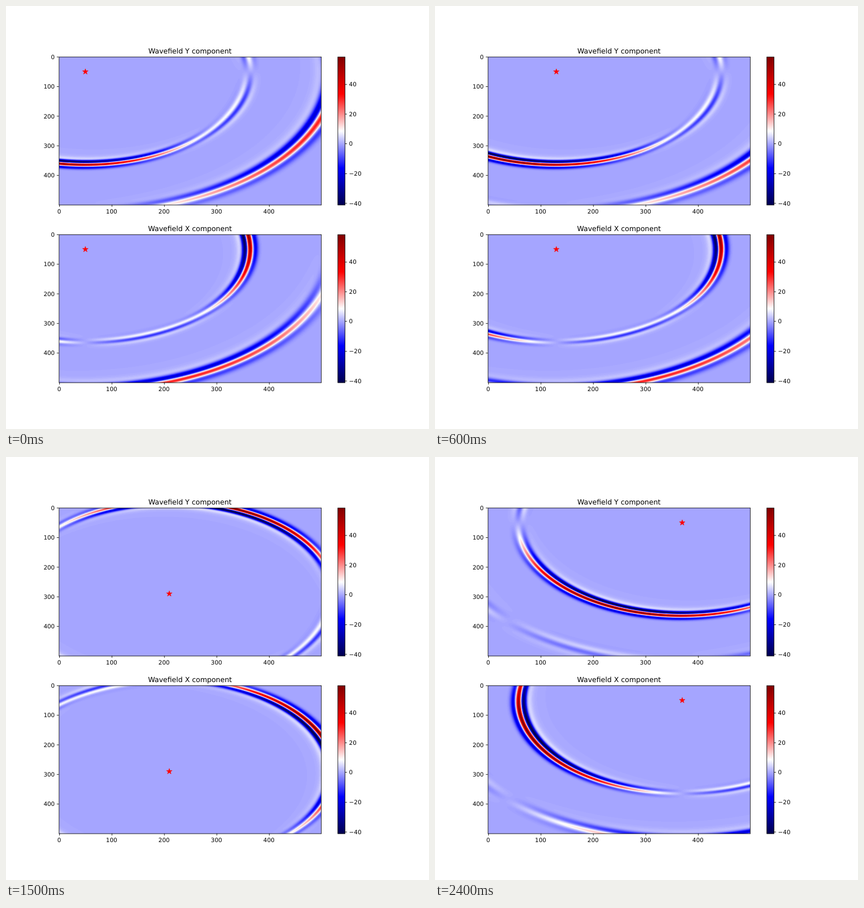
Write an HTML page with a canvas that moves like this. It is 748 px wide and 748 px high and loops after 2.5 s.

```html
<!DOCTYPE html>
<html lang="en">
<head>
<meta charset="utf-8">
<title>Wavefield components</title>
<style>
  html, body { margin: 0; width: 100%; height: 100%; overflow: hidden; background: #fff; }
  #stage { position: relative; width: 748px; height: 748px; overflow: hidden; }
  canvas, svg { position: absolute; left: 0; top: 0; }
  text { font: 10.39px "DejaVu Sans", sans-serif; fill: #000; text-rendering: geometricPrecision; }
  .title { font-size: 12.47px; }
  .line { stroke: #000; stroke-width: .85; fill: none; }
  .star { fill: #f00; stroke: #f00; stroke-width: .7; stroke-linejoin: round; }
</style>
</head>
<body>
<div id="stage">
  <canvas id="field" width="748" height="748"></canvas>
  <svg id="plot" width="748" height="748" viewBox="0 0 748 748">
    <defs>
      <linearGradient id="seismic" x1="0" y1="0" x2="0" y2="1">
        <stop offset="0" stop-color="#800000"/>
        <stop offset=".25" stop-color="#f00"/>
        <stop offset=".5" stop-color="#fff"/>
        <stop offset=".75" stop-color="#00f"/>
        <stop offset="1" stop-color="#00004d"/>
      </linearGradient>
    </defs>
  </svg>
</div>
<script>
const STEP = 100, STEPS = 25, ROWS = 6;
const LEFT = 93.5, WIDTH = 463.76, HEIGHT = 261.8, N = 500;
const TOPS = [89.76, 403.92];
const BAR = { x: 586.24, w: 13.09 };
const VMIN = -41.08, VMAX = 58.35;
const SX = WIDTH / N, SY = HEIGHT / N;
const TICK = 3.64, GAP = 7.27;
const UNIT = .748; // the plot is laid out on a 1000-unit square

const svg = document.getElementById("plot");
const ctx = document.getElementById("field").getContext("2d");
ctx.imageSmoothingQuality = "high";

const toX = x => LEFT + (x + .5) * SX;
const toY = (y, top) => top + (y + .5) * SY;
const snap = v => (Math.floor(v / UNIT + .5) + .5) * UNIT;

function add(tag, attrs, text) {
  const el = document.createElementNS("http://www.w3.org/2000/svg", tag);
  for (const k in attrs) el.setAttribute(k, attrs[k]);
  if (text !== undefined) el.textContent = text;
  svg.appendChild(el);
  return el;
}
const line = d => add("path", { class: "line", d });
const label = (x, y, anchor, text) => add("text", { x, y, "text-anchor": anchor }, text);

function box(x, y, w, h, fill) {
  const l = snap(x), t = snap(y);
  const rect = { x: l, y: t, width: snap(x + w) - l, height: snap(y + h) - t };
  if (fill) add("rect", { ...rect, fill });
  add("rect", { ...rect, class: "line" });
}

function starPath() {
  let d = "";
  for (let i = 0; i < 10; i++) {
    const r = i % 2 ? 1.985 : 5.2, a = i * Math.PI / 5;
    d += (i ? "L" : "M") + r * Math.sin(a) + " " + -r * Math.cos(a);
  }
  return d + "Z";
}

function drawAxes(top, name) {
  const bottom = top + HEIGHT;
  box(LEFT, top, WIDTH, HEIGHT);
  box(BAR.x, top, BAR.w, HEIGHT, "url(#seismic)");
  for (let v = 0; v < N; v += 100) {
    const x = toX(v), y = toY(v, top);
    line(`M${snap(x)} ${bottom}v${TICK}`);
    label(x, bottom + GAP + 7.7, "middle", v);
    line(`M${LEFT} ${snap(y)}h${-TICK}`);
    label(LEFT - GAP, y + 3.8, "end", v);
  }
  for (let v = -40; v <= 40; v += 20) {
    const y = top + (VMAX - v) / (VMAX - VMIN) * HEIGHT, x = BAR.x + BAR.w;
    line(`M${x} ${snap(y)}h${TICK}`);
    label(x + GAP, y + 3.8, "start", v < 0 ? "\u2212" + -v : v);
  }
  const title = label(LEFT + WIDTH / 2, top - 6.23, "middle", `Wavefield ${name} component`);
  title.setAttribute("class", "title");
  return add("path", { class: "star", d: starPath() });
}

// Colour map: dark blue, blue, white, red, dark red
const lut = Array.from({ length: 256 }, (_, i) => {
  const p = i / 255, ramp = v => Math.round(255 * Math.max(0, Math.min(1, v)));
  return [
    ramp(p < .75 ? 4 * p - 1 : 2.5 - 2 * p),
    ramp(p < .5 ? 4 * p - 1 : 3 - 4 * p),
    ramp(p < .25 ? .3 + 2.8 * p : 3 - 4 * p)
  ];
});

// Pulse sampled over scaled delay, built from its spectrum
const T0 = -6, T1 = 16, DT = .02;
const pulse = new Float32Array(Math.round((T1 - T0) / DT) + 1).map((_, i) => {
  let sum = 0;
  for (let w = .05; w < 6; w += .1)
    sum += w ** 2.5 * Math.exp(-w * w / 2) * Math.cos(w * (T0 + i * DT) + Math.PI / 4);
  return sum;
});
const peak = Math.max(...pulse);

const FAST = { r: 470.5, len: 9.3, amp: 25.5 };
const SLOW = { r: 310.7, len: 6.2, amp: 50 };
const LAG = 1.2;   // lead of the cross term in the slow wave
const SHIFT = 1;   // wave centre relative to the star

function sample(wave, r) {
  const i = Math.round(((wave.r - r) / wave.len - T0) / DT);
  return i >= 0 && i < pulse.length ? wave.amp * pulse[i] / peak : 0;
}

const panels = TOPS.map(top => {
  const canvas = document.createElement("canvas");
  canvas.width = canvas.height = N;
  const grid = canvas.getContext("2d");
  return { top, canvas, grid, img: grid.createImageData(N, N) };
});

function paint({ img }, k, value) {
  const p = (value - VMIN) / (VMAX - VMIN);
  const c = lut[Math.max(0, Math.min(255, Math.floor(p * 256)))];
  img.data[k] = c[0];
  img.data[k + 1] = c[1];
  img.data[k + 2] = c[2];
  img.data[k + 3] = 255;
}

function drawField(sx, sy) {
  for (let j = 0, k = 0; j < N; j++) {
    const dy = j - sy - SHIFT;
    for (let i = 0; i < N; i++, k += 4) {
      const dx = i - sx - SHIFT;
      const r = Math.hypot(dx, dy) || 1, c = dx / r, s = dy / r;
      // Diagonal force: fast radial wave, slow transverse wave
      const radial = (c + s) * sample(FAST, r);
      const slow = sample(SLOW, r), cross = c * s * sample(SLOW, r - LAG);
      paint(panels[0], k, c * radial + s * s * slow - cross);
      paint(panels[1], k, s * radial + c * c * slow - cross);
    }
  }
  ctx.clearRect(0, 0, 748, 748);
  for (const { top, canvas, grid, img } of panels) {
    grid.putImageData(img, 0, 0);
    ctx.drawImage(canvas, LEFT, top, WIDTH, HEIGHT);
  }
}

const stars = [drawAxes(TOPS[0], "Y"), drawAxes(TOPS[1], "X")];

let shown = -1;
function show(step) {
  if (step === shown) return;
  shown = step;
  const x = 50 + 80 * Math.floor(step / ROWS), y = 50 + 80 * (step % ROWS);
  drawField(x, y);
  stars.forEach((el, n) => el.setAttribute("transform", `translate(${toX(x)} ${toY(y, TOPS[n])})`));
}

const start = performance.now();
function tick() {
  show(Math.floor((performance.now() - start) / STEP) % STEPS);
  requestAnimationFrame(tick);
}
tick();
</script>
</body>
</html>
```
